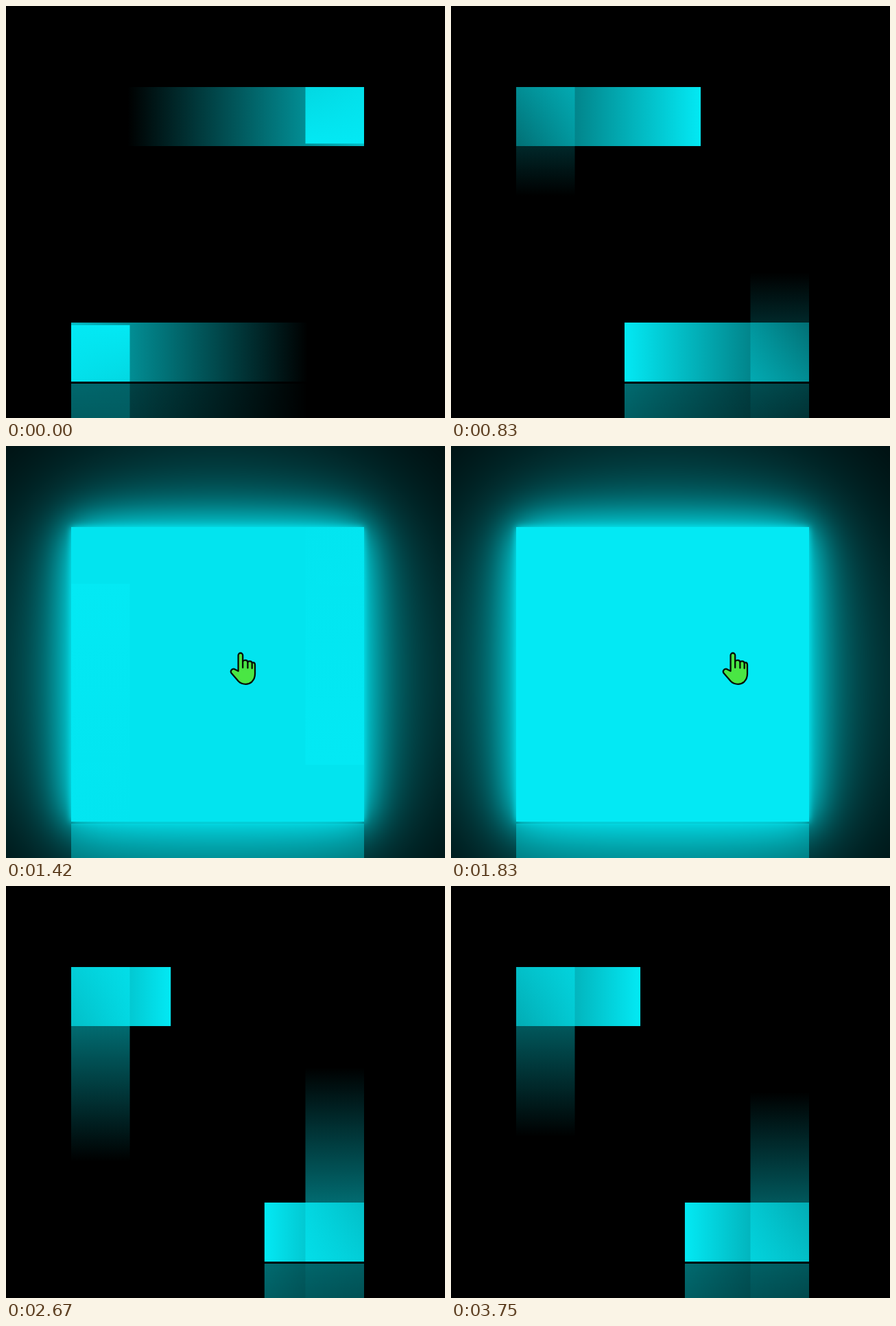
Write an HTML page with a canvas that moves like this. It is 640 by 600 pixels and loops after 3830 ms.

```html
<!DOCTYPE html>
<html lang="en">
<head>
<meta charset="utf-8">
<title>Neon square</title>
<style>
  html, body { margin: 0; width: 640px; height: 600px; overflow: hidden; background: #000; }
  canvas, svg { position: absolute; left: 0; top: 0; }
</style>
</head>
<body>
<canvas id="glow" width="640" height="600"></canvas>
<svg width="640" height="600" viewBox="0 0 640 600">
  <defs>
    <linearGradient id="toRight"><stop stop-color="#03e9f4" stop-opacity="0"/><stop offset="1" stop-color="#03e9f4"/></linearGradient>
    <linearGradient id="toLeft" href="#toRight" x1="1" x2="0"/>
    <linearGradient id="toBottom" href="#toRight" x2="0" y2="1"/>
    <linearGradient id="toTop" href="#toRight" x2="0" y1="1" y2="0"/>
    <linearGradient id="fade" x2="0" y2="1"><stop stop-color="#fff" stop-opacity="0"/><stop offset="1" stop-color="#fff" stop-opacity=".46"/></linearGradient>
    <clipPath id="frame"><rect x="95" y="118" width="427" height="429"/></clipPath>
    <mask id="mirror" maskUnits="userSpaceOnUse" x="95" y="118" width="427" height="429">
      <rect x="95" y="118" width="427" height="429" fill="url(#fade)"/>
    </mask>
  </defs>
  <g id="box" clip-path="url(#frame)">
    <rect id="face" x="95" y="118" width="427" height="429" fill="#03e9f4"/>
    <rect id="top" y="118" width="427" height="86" fill="url(#toRight)"/>
    <rect id="right" x="436.5" width="85.5" height="429" fill="url(#toBottom)"/>
    <rect id="bottom" y="461" width="427" height="86" fill="url(#toLeft)"/>
    <rect id="left" x="95" width="85.5" height="429" fill="url(#toTop)"/>
  </g>
  <g transform="matrix(1 0 0 -1 0 1096.5)">
    <g mask="url(#mirror)"><use href="#box"/></g>
  </g>
  <g id="hand" fill="#4ae644" stroke="#061006" stroke-width="2.3" stroke-linejoin="round" stroke-linecap="round">
    <path d="M-3 327V304a3.3 3.3 0 0 1 6.6 0V313q1-2 3.6-2 3 0 3.6 2.6 1-1 3-1 3 0 3.3 2.6 1-1 2.3-.6 2 .6 2 3.5V331q0 7-4.5 11.5-4 3.5-9 3.5-6.5 0-10.5-4L-13 330q-2-3 1-5.5 2.5-1.5 5 .5z"/>
    <path fill="none" d="M3.6 313v9M10.8 314v8.5M17.1 316v7"/>
  </g>
</svg>
<script>
const $ = id => document.getElementById(id);
const LOOP = 3830, STEP = 1000 / 12;
const X = 95, Y = 118, W = 427, H = 429;
const ENTER = 1010, LEAVE = 1940, FADE = 500;
const SIGMAS = [5, 25, 50, 200];
const ctx = $('glow').getContext('2d');
const image = ctx.createImageData(640, 600);

// [time in steps, value]; the phase counts sides travelled by a light bar
const phaseKeys = [[0, 1.192], [10, 2.63], [14, 3.301], [32, 6.34], [39, 7.481], [45, 8.424]];
const handKeys = [[12, 530], [13, 440], [14, 365], [17, 342], [20, 360], [22, 411], [23, 495], [24, 590]];

function along(keys, t) {
  let i = 1;
  while (i < keys.length - 1 && t > keys[i][0]) i++;
  const [a, p] = keys[i - 1], [b, q] = keys[i];
  return p + (q - p) * (t - a) / (b - a);
}

// cubic-bezier(.25, .1, .25, 1)
function ease(x) {
  if (x <= 0) return 0;
  if (x >= 1) return 1;
  const curve = (s, a, b) => 3 * s * (1 - s) ** 2 * a + 3 * s * s * (1 - s) * b + s ** 3;
  let lo = 0, hi = 1;
  for (let i = 0; i < 20; i++) {
    const mid = (lo + hi) / 2;
    if (curve(mid, .25, .25) < x) lo = mid; else hi = mid;
  }
  return curve(lo, .1, 1);
}

const hover = t => ease((t - ENTER) / FADE) - ease((t - LEAVE) / FADE);

function erf(x) {
  const t = 1 / (1 + .3275911 * Math.abs(x));
  const poly = t * (.254829592 + t * (-.284496736 + t * (1.421413741 + t * (-1.453152027 + t * 1.061405429))));
  return Math.sign(x) * (1 - poly * Math.exp(-x * x));
}

// Gaussian blur of a bar from start to start + size, sampled at pixel centres
function profile(count, start, size, sigma) {
  const k = 1 / (sigma * Math.SQRT2);
  return Float32Array.from({ length: count }, (_, i) => {
    const d = i + .5 - start;
    return (erf(d * k) - erf((d - size) * k)) / 2;
  });
}

// four stacked blurred shadows of the box
function drawGlow(lit) {
  ctx.clearRect(0, 0, 640, 600);
  if (lit < .002) return;
  const across = SIGMAS.map(s => profile(640, X, W, s * lit));
  const down = SIGMAS.map(s => profile(600, Y, H, s * lit));
  const px = image.data;
  for (let y = 0, i = 0; y < 600; y++) {
    for (let x = 0; x < 640; x++, i += 4) {
      let dark = 1;
      for (let n = 0; n < SIGMAS.length; n++) dark *= 1 - lit * across[n][x] * down[n][y];
      px[i] = 3 * (1 - dark);
      px[i + 1] = 233 * (1 - dark);
      px[i + 2] = 244 * (1 - dark);
      px[i + 3] = 255;
    }
  }
  ctx.putImageData(image, 0, 0);
  ctx.clearRect(X, Y, W, H);
}

function draw(step) {
  const phase = along(phaseKeys, step);
  const u = phase % 2 - 1, v = (phase + 1) % 2 - 1;
  $('top').setAttribute('x', X + u * W);
  $('bottom').setAttribute('x', X - u * W);
  $('right').setAttribute('y', Y + v * H);
  $('left').setAttribute('y', Y - v * H);

  const lit = hover(step * STEP);
  $('face').setAttribute('opacity', lit);
  drawGlow(lit);

  const x = along(handKeys, step);
  const inside = step > 12 && step < 24 && x < X + W;
  $('hand').setAttribute('visibility', inside ? 'visible' : 'hidden');
  $('hand').setAttribute('transform', `translate(${x - .4} .8)`);
}

let start = null, shown = -1;
function tick(now) {
  if (start === null) start = now;
  const t = (now - start) % LOOP;
  const step = Math.min(45, Math.floor((t + 5) / STEP));
  if (step !== shown) draw(shown = step);
  requestAnimationFrame(tick);
}
draw(0);
requestAnimationFrame(tick);
</script>
</body>
</html>
```
